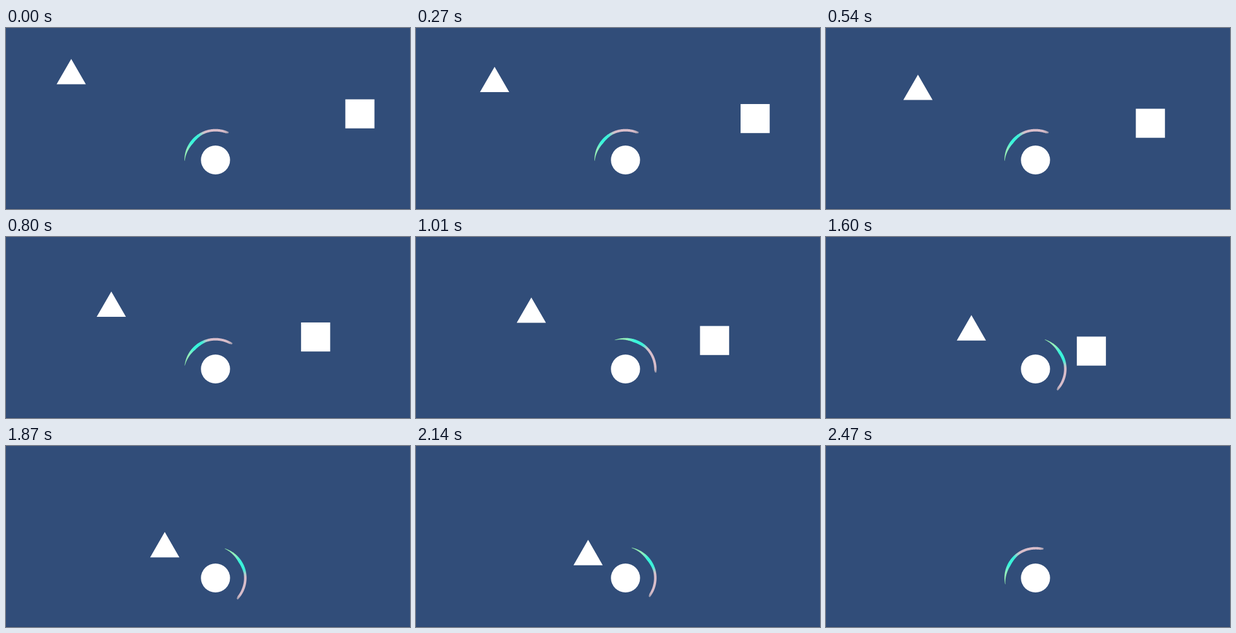
An HTML page with a canvas for the animation above (3070 ms loop, 641 by 288 pixels).

```html
<!DOCTYPE html>
<html lang="en">
<head>
<meta charset="utf-8">
<title>Shield</title>
<style>
  html, body { margin: 0; width: 100%; height: 100%; overflow: hidden; background: #314d79; }
  canvas { display: block; width: 641px; height: 288px; }
</style>
</head>
<body>
<canvas id="stage" width="641" height="288"></canvas>
<script>
const ctx = document.getElementById('stage').getContext('2d');
const LOOP = 3070, STEP = 66.66, LAST = 37;
const CENTER = { x: 332.4, y: 210 };
const SPAN = 117, OUTER = 49.3;
const rad = deg => deg * Math.PI / 180;

// Shield thickness: [degrees from the tail, width]
const WIDTHS = [[0, 0.5], [14, 2.3], [28, 4], [38, 5], [50, 4.8], [64, 4], [95, 4], [112, 3.8], [117, 2.4]];
// Shield colour: [degrees from the tail, colour]
const COLORS = [[0, '#8fe8a8'], [22, '#93f0bd'], [32, '#5cf2d0'], [38, '#38f5dc'], [56, '#3df0d8'],
  [66, '#b9cbcb'], [71, '#d8bdca'], [106, '#d8bdca'], [113, '#bcabb8'], [117, '#8f93a8']];

function lerpTable(table, x) {
  const i = Math.max(1, table.findIndex(p => p[0] >= x));
  const [x0, y0] = table[i - 1], [x1, y1] = table[i];
  return y0 + (y1 - y0) * (x - x0) / (x1 - x0);
}

const shield = new Path2D();
for (let a = 0; a <= SPAN; a++) {
  shield.lineTo(OUTER * Math.cos(rad(a)), OUTER * Math.sin(rad(a)));
}
for (let a = SPAN; a >= 0; a--) {
  const r = OUTER - lerpTable(WIDTHS, a);
  shield.lineTo(r * Math.cos(rad(a)), r * Math.sin(rad(a)));
}
shield.closePath();

const paint = ctx.createConicGradient(rad(-10), 0, 0);
for (const [a, color] of COLORS) paint.addColorStop((a + 10) / 360, color);

const easeInOut = p => p < 0.5 ? 2 * p * p : 1 - 2 * (1 - p) * (1 - p);
const progress = (t, from, to) => Math.min(1, Math.max(0, (t - from) / (to - from)));

// Direction of the shield's tail, in degrees
function tailAngle(t) {
  const back = progress(t, 2037, 2468);
  return 178.5 + 109 * easeInOut(progress(t, 702, 1212)) - 120 * back * back;
}

function drawTriangle(t) {
  const x = 103.5 + 0.0795 * t, y = 49.3 + 0.0469 * t;
  ctx.beginPath();
  ctx.moveTo(x, y);
  ctx.lineTo(x + 23.2, y + 40.3);
  ctx.lineTo(x - 23.2, y + 40.3);
  ctx.fill();
}

function draw(t) {
  ctx.fillStyle = '#314d79';
  ctx.fillRect(0, 0, 641, 288);
  ctx.fillStyle = '#2c466f';
  ctx.fillRect(0, 287, 641, 1);

  ctx.fillStyle = '#fff';
  if (t < 2350) drawTriangle(t);
  if (t < 1795) ctx.fillRect(538.4 - 0.0878 * t, 113.5 + 0.0281 * t, 46.2, 46.2);
  ctx.beginPath();
  ctx.arc(CENTER.x, CENTER.y, 23.1, 0, 2 * Math.PI);
  ctx.fill();

  ctx.save();
  ctx.translate(CENTER.x, CENTER.y);
  ctx.rotate(rad(tailAngle(t)));
  ctx.fillStyle = paint;
  ctx.fill(shield);
  ctx.restore();
}

const start = performance.now();
function tick() {
  const t = (performance.now() - start) % LOOP;
  draw(Math.min(LAST, Math.floor(t / STEP)) * STEP);
  requestAnimationFrame(tick);
}
tick();
</script>
</body>
</html>
```
